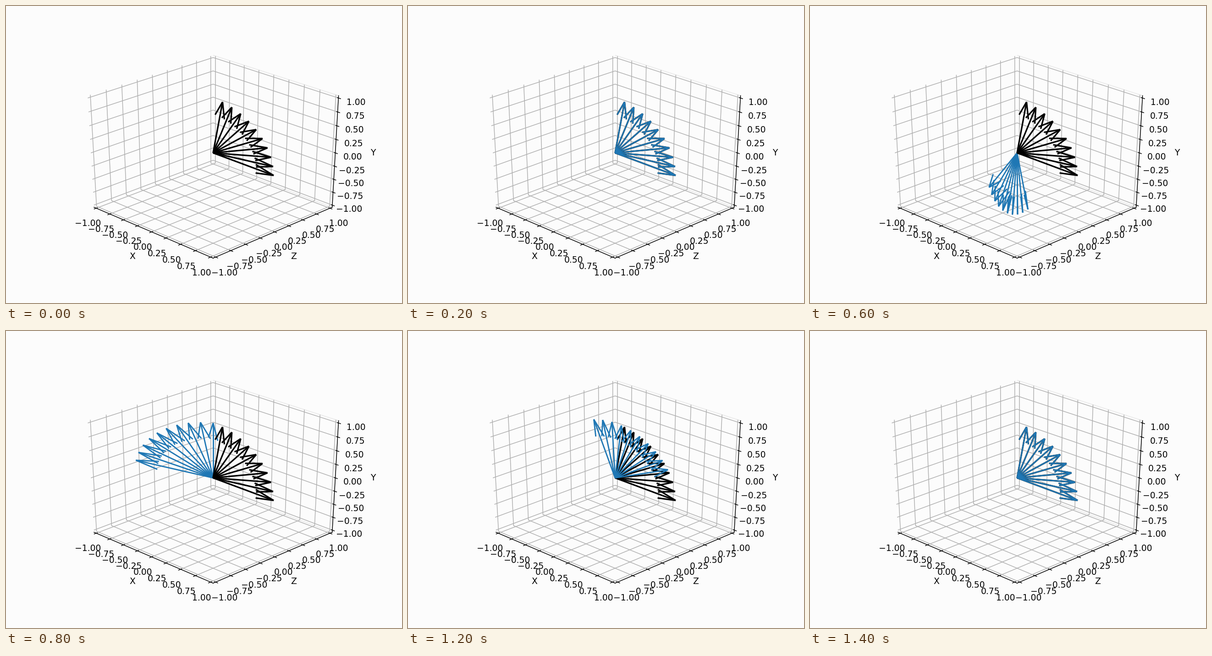
Write a matplotlib script that moves like this. It is 864 px wide and 648 px high and loops after 1600 ms.

```python
import numpy as np
import matplotlib.pyplot as plt
from matplotlib.animation import FuncAnimation

BACKGROUND = "#fcfcfc"
BLUE = "#1f77b4"
LIMIT = 25 / 24
# (pitch, roll) in degrees for every step after the bare fan
POSES = [(0, 0), (-90, 0), (-119.7, 29.6), (90, 27), (90, 4.9), (30, 0), (0, 0)]

fig = plt.figure(figsize=(6.4, 4.8), dpi=135, facecolor=BACKGROUND)
ax = fig.add_subplot(projection="3d")


def draw_fan(pitch, roll, color, width):
    """Ten unit arrows, 9 degrees apart, rolled about X and then pitched."""
    p, r = np.radians([pitch, roll])
    first = np.array([np.cos(p), 0, np.sin(p)])
    second = np.array([-np.cos(r) * np.sin(p), -np.sin(r), np.cos(r) * np.cos(p)])
    angle = np.radians(9 * np.arange(10))
    u, v, w = np.outer(first, np.cos(angle)) + np.outer(second, np.sin(angle))
    origin = np.zeros(10)
    return ax.quiver(origin, origin, origin, u, v, w, color=color, linewidth=width)


def style_axes():
    ax.set_facecolor(BACKGROUND)
    ax.set(xlim=(-LIMIT, LIMIT), ylim=(-LIMIT, LIMIT), zlim=(-LIMIT, LIMIT),
           xlabel="X", ylabel="Z", zlabel="Y")
    ax.view_init(elev=30, azim=-45)
    # A unit cube stretched over the whole subplot area
    ax.set_box_aspect((1, 1, 1), zoom=3 ** 0.5 * 3.5 / 41 ** 0.5)
    ax.apply_aspect = lambda position=None: None
    for axis in (ax.xaxis, ax.yaxis, ax.zaxis):
        axis.set_pane_color((1, 1, 1, 0))
    ax.yaxis.set_pane_color((0.92, 0.92, 0.92, 1))
    ax.yaxis.pane.set_fill(False)


draw_fan(0, 0, "black", 1.75)
fans = [draw_fan(pitch, roll, BLUE, 1.5) for pitch, roll in POSES]
style_axes()


def update(frame):
    for step, fan in enumerate(fans, start=1):
        fan.set_visible(step == frame)
    return fans


anim = FuncAnimation(fig, update, frames=len(POSES) + 1, interval=200,
                     repeat=True, repeat_delay=0, blit=False)
plt.show()
```
